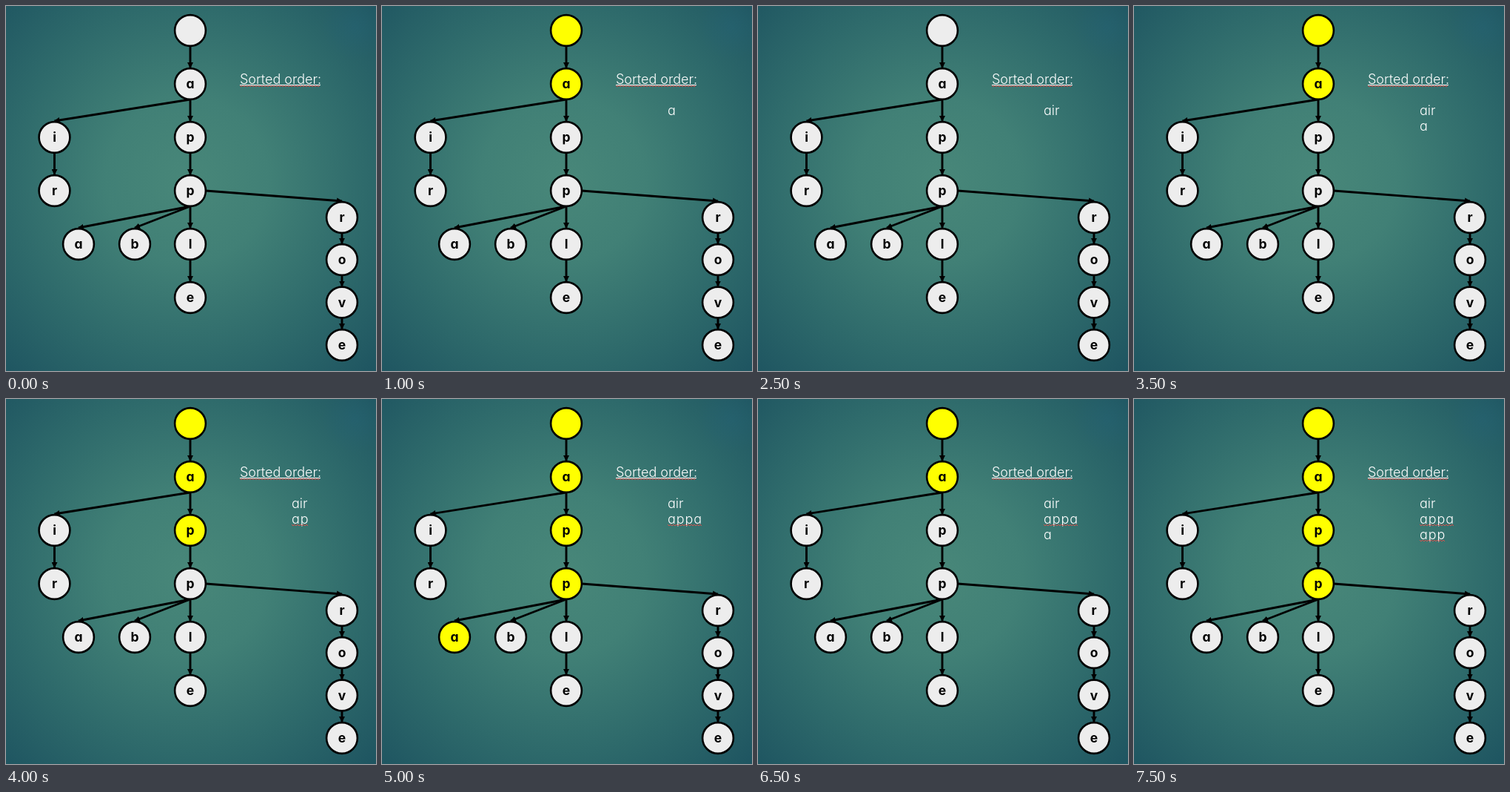
Write an HTML page that moves like this. It is 500 px wide and 492 px high and loops after 8 s.

```html
<!DOCTYPE html>
<html>
<head>
<meta charset="utf-8">
<style>
html, body { margin: 0; width: 100%; height: 100%; overflow: hidden; }
svg { display: block; width: 100vw; height: 100vh; }
text { font-family: Inter, "Open Sans", sans-serif; font-feature-settings: "cv11"; }
.node circle { fill: #ededed; stroke: #000; stroke-width: 2.6; }
.node.on circle { fill: #ff0; }
.node text { font-size: 17.5px; font-weight: 700; text-anchor: middle; }
.edge { stroke: #000; stroke-width: 2.9; marker-end: url(#head); }
.note { font-size: 18px; font-weight: 300; fill: #fff; }
.wide { letter-spacing: .9px; }
.squiggle { fill: none; stroke: #d8504c; stroke-width: 1; }
</style>
</head>
<body>
<svg id="stage" viewBox="0 0 500 492">
  <defs>
    <radialGradient id="bg" gradientUnits="userSpaceOnUse" cx="245" cy="235" r="370">
      <stop offset="0" stop-color="#488779"/>
      <stop offset=".3" stop-color="#418076"/>
      <stop offset=".65" stop-color="#2e6a6b"/>
      <stop offset="1" stop-color="#1d5360"/>
    </radialGradient>
    <radialGradient id="glow">
      <stop offset="0" stop-color="#256478" stop-opacity=".4"/>
      <stop offset="1" stop-color="#256478" stop-opacity="0"/>
    </radialGradient>
    <marker id="head" markerUnits="userSpaceOnUse" markerWidth="8" markerHeight="8" refX="7" refY="4" orient="auto">
      <path d="M0 0L8 4L0 8z"/>
    </marker>
  </defs>
  <rect width="500" height="492" fill="url(#bg)"/>
  <circle cx="472" cy="28" r="45" fill="url(#glow)"/>
  <g id="tree"></g>
  <text class="note" x="316" y="105">Sorted order:</text>
  <path d="M316 106.5H425" stroke="#fff"/>
  <g id="words"></g>
</svg>
<script>
const STEP = 500, LOOP = 8000;

// Each node: path from the root, centre x, centre y
const nodes = [
  ["", 249, 33], ["a", 249, 105], ["ai", 65.5, 177], ["air", 65.5, 249],
  ["ap", 249, 177], ["app", 249, 249], ["appa", 98, 321], ["appb", 174, 321],
  ["appl", 249, 321], ["apple", 249, 393], ["appr", 454, 285],
  ["appro", 454, 342], ["approv", 454, 399.5], ["approve", 454, 457]
];

// Null marks the pause before each walk
const walk = [null, "", "a", "ai", "air", null, "", "a", "ap", "app", "appa",
  null, "", "a", "ap", "app"];

const tree = document.getElementById("tree");
const words = document.getElementById("words");

function squiggle(x, y, width) {
  let d = `M${x} ${y}`;
  for (let i = 1; i * 2 <= width; i++) d += `L${x + i * 2} ${y + (i % 2) * 2}`;
  return `<path class="squiggle" d="${d}"/>`;
}

function edge([path, x, y]) {
  if (!path) return "";
  const [, px, py] = nodes.find(n => n[0] === path.slice(0, -1));
  const start = path === "appr" ? [px + 21, py] : [px, py + 21];
  return `<line class="edge" x1="${start[0]}" y1="${start[1]}" x2="${x}" y2="${y - 22}"/>`;
}

function node([path, x, y]) {
  return `<g class="node"><circle cx="${x}" cy="${y}" r="20.9"/>
    <text x="${x}" y="${y + 6}">${path.slice(-1)}</text></g>`;
}

function word(text, row) {
  const y = 147 + row * 21, flagged = text.startsWith("ap");
  return `<text class="note ${flagged ? "wide" : ""}" x="386" y="${y}">${text}</text>` +
    (flagged ? squiggle(386, y + 1, text.length * 11.8) : "");
}

tree.innerHTML = nodes.map(edge).join("") + nodes.map(node).join("");
tree.insertAdjacentHTML("afterend", squiggle(316, 107, 109));
const shapes = tree.querySelectorAll(".node");
let shown = -1;

function draw(step) {
  const current = walk[step];
  const rows = [];
  walk.slice(0, step + 1).forEach((path, i) => {
    if (path && (i === step || walk[i + 1] === null)) rows.push(path);
  });
  nodes.forEach(([path], i) =>
    shapes[i].classList.toggle("on", current !== null && current.startsWith(path)));
  words.innerHTML = rows.map(word).join("");
}

function tick() {
  const step = Math.floor(performance.now() % LOOP / STEP);
  if (step !== shown) draw(shown = step);
  requestAnimationFrame(tick);
}
tick();
</script>
</body>
</html>
```
